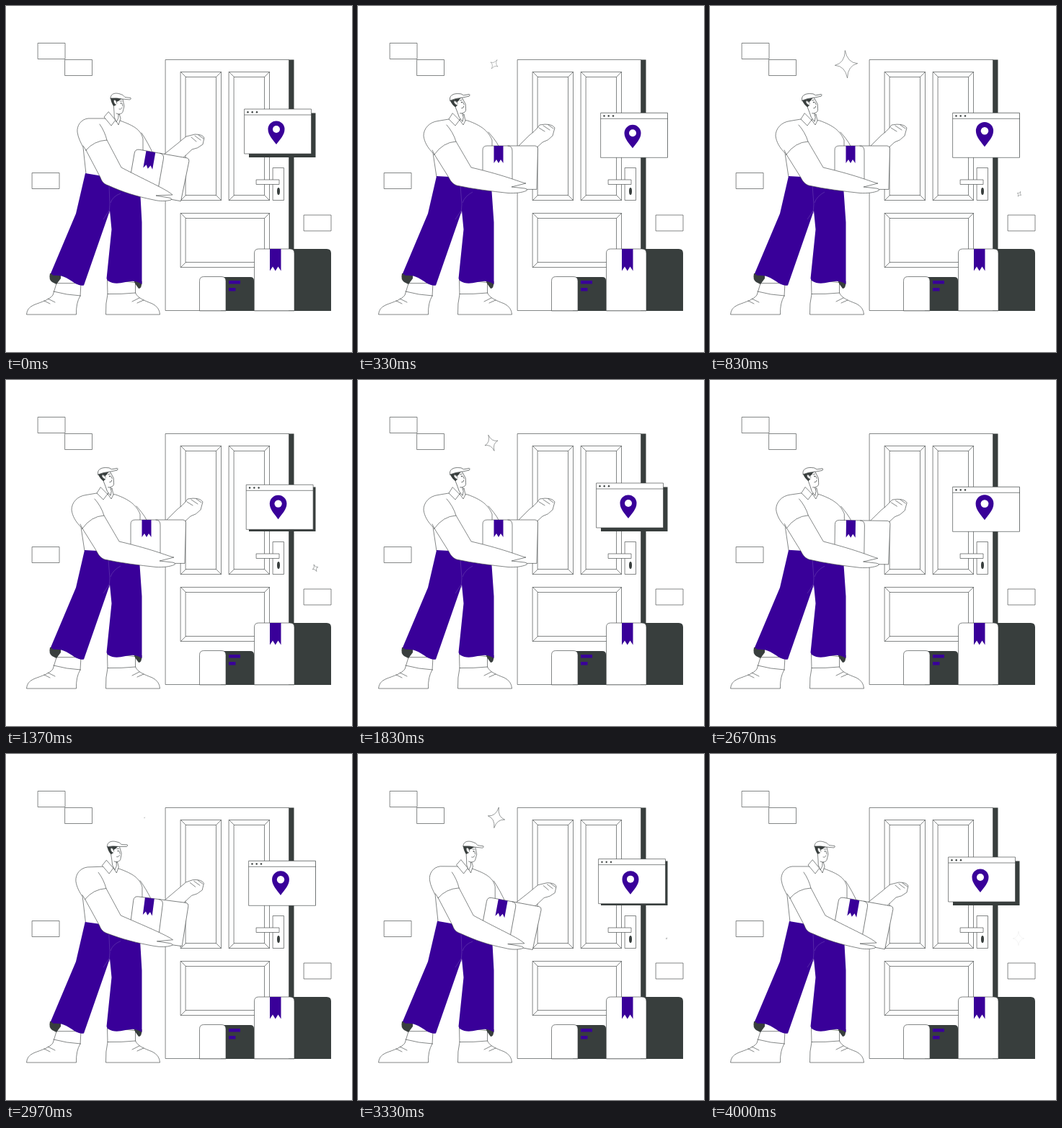
Recreate the animation shown at these times as an HTML page. Size 480 px wide and 480 px high, loop 4.03 s.

```html
<!DOCTYPE html>
<html lang="en">
<head>
<meta charset="utf-8">
<title>Delivery at the door</title>
<style>
html, body { margin: 0; width: 100%; height: 100%; overflow: hidden; background: #fff; }
svg { display: block; width: 100vw; height: 100vh; }
.l { fill: #fff; stroke: #414646; stroke-width: .65; stroke-linejoin: round; stroke-linecap: round; }
.n { fill: none; }
.d { fill: #383e3d; }
.p { fill: #390099; }
.c { fill: none; stroke: #6a42b2; stroke-width: .6; }
#stars path { stroke-width: .5; }
</style>
</head>
<body>
<svg viewBox="0 0 480 480">
  <g id="wall"></g>
  <g id="door">
    <path class="d" d="M392 74.500h7.500V340H392z"/>
    <path class="l" d="M221.500 74.500h171V422.500h-171z"/>
  </g>
  <path class="l" d="M370.500 224.500h15v45h-15z"/>
  <path class="l" d="M347.500 241h31.500v6.500h-31.500z"/>
  <ellipse class="d" cx="378" cy="257" rx="2" ry="5"/>

  <g id="boots">
    <path class="l" d="M70 385L65 401C60 408 50 410 38 415Q29 419 28.500 428H97.500Q97 412 103 402L104 385Z"/>
    <path class="l n" d="M66 396Q84 401 103.500 402M58 406l10 5M53 409l8 4"/>
    <path class="l" d="M140.500 380L141 400Q138 412 138.500 428H213.500Q213 418 203 413C190 408 183 405 179.500 398V384Z"/>
    <path class="l n" d="M141 399.500Q160 400 179.500 398M185 405l-10 5M191 408l-9 4"/>
    <path class="d" d="M61 371Q59 380 64 383L70 386L76 378V370ZM177 380L179 385L184 392Q188.500 392 188.500 382Z"/>
  </g>
  <g id="man"></g>
  <g id="parcel">
    <path class="l" d="M173 254V200Q173 194 179 194H246Q249.500 194.500 249.500 198L248 254Z"/>
    <path class="l n" d="M208 194Q214 194 214 201V250"/>
    <path class="p" d="M188.500 194h13v24l-3.500-5l-3 5l-3-5l-3.500 5z"/>
  </g>
  <g id="arm"></g>
  <g id="head">
    <path class="l" d="M149 134L150 147Q149 154 153 161Q157 156 156 150Q162 150 162.500 145L164 139L162 129H150Z"/>
    <path class="d" d="M145 128H161.500Q158 130 156 132Q153 132 153 137L149.500 139Q146 135 145 128Z"/>
    <path class="l" d="M152 137Q148 133 150 130Q153 130 154 135"/>
    <path class="l n" d="M157 143Q160 144 161 141M161 135l1 4M156 150l-3-1M158 132l3 0"/>
    <circle class="d" cx="159.500" cy="135" r=".8"/>
    <path class="l" d="M145 128C145 121 152 120 158 122Q163 123 165 126.500L173 127.500Q174 129 172 130L161 129Q153 127 145 128Z"/>
  </g>

  <g id="stack">
    <path class="d" d="M392 337h53q6 0 6 6V423H392z"/>
    <path class="d" d="M298 376h41q5 0 5 5V423H298z"/>
    <path class="l" d="M268.500 422.500V381.500q0-6 6-6H299q6 0 6 6V422.500z"/>
    <path class="p" d="M309 381h16v4.500h-16zM309 391h9.500v4.500H309z"/>
    <path class="l" d="M344.500 422.500V343q0-6 6-6H394q6 0 6 6V422.500z"/>
    <path class="p" d="M366 337h15.500V367.500l-4-6l-3.750 6l-3.750-6l-4 6z"/>
  </g>

  <path class="d" d="M337 148.500h92.500V210H337z"/>
  <g id="panel">
    <path class="l" d="M331 143h92.500v62H331zM331 151h92.500"/>
    <g class="d">
      <circle cx="335.500" cy="147.200" r="1.200"/>
      <circle cx="341.700" cy="147.200" r="1.200"/>
      <circle cx="348" cy="147.200" r="1.200"/>
    </g>
    <g id="pin">
      <path class="p" d="M375 192C370 185 363.500 179 363.500 171A11.500 11.500 0 0 1 386.500 171C386.500 179 380 185 375 192Z"/>
      <circle cx="375" cy="171" r="5" fill="#fff"/>
    </g>
  </g>
  <g id="stars"></g>
</svg>
<script>
const LOOP = 4030;
const $ = id => document.getElementById(id);

function add(parent, cls, d) {
  const el = document.createElementNS("http://www.w3.org/2000/svg", "path");
  el.setAttribute("class", cls);
  if (d) el.setAttribute("d", d);
  return $(parent).appendChild(el);
}

const rect = (x, y, w, h) => `M${x} ${y}h${w}v${h}h${-w}z`;
for (const [x, y] of [[44.5, 51.5], [82, 74.5], [36.5, 231.5], [413.5, 290]])
  add("wall", "l", rect(x, y, 37.5, 22));

// Door fields: outer frame, bevel inset, mitred corners.
function field(x, y, w, h, b) {
  add("door", "l", rect(x, y, w, h) + rect(x + b, y + b, w - 2 * b, h - 2 * b));
  for (const [cx, cy, sx, sy] of [[x, y, 1, 1], [x + w, y, -1, 1], [x, y + h, 1, -1], [x + w, y + h, -1, -1]])
    add("door", "l", `M${cx} ${cy}l${sx * b} ${sy * b}`);
}
field(242.5, 91.5, 56, 178, 7);
field(309.5, 91.5, 56, 178, 7);
field(242.5, 287.5, 123, 75, 7);

// Body parts: group, class, upright pose, leaning-back pose.
const parts = [
  ["man", "l",
    "M219 206L239 190Q246 184 250 181L262 178Q273 178 275 183L273 192Q266 198 258 199L242 214Z",
    "M221 196L237 180Q245 174 249 169L252 165Q268 162 273 169L270 180Q264 187 256 189L244 200Z"],
  ["man", "l n",
    "M257 182L264 188M262 180L270 186M267 179L274 184",
    "M251 169L259 174M257 166L266 172M264 165L271 170"],
  ["man", "l",
    "M136 156L114 156C104 157 98 166 99 175C100 183 104 190 107 196L111 233L150 245L190 240L190 184C187 172 178 166 158 159Z",
    "M126 157L111 159.500C99 161 91 170 91 180C92 189 97 197 104 204L109 237L148 245L186 245L186 186C181 174 172 166 152 159Z"],
  ["man", "l n",
    "M188 176C194 185 200 196 204 205",
    "M181 175C187 182 192 188 195 194"],
  ["man", "p",
    "M110 232L146 238L186 255L188.5 300L188.5 386C172 374 158 392 141 381L139.5 378L146.5 310L144 284L108 387.5C94 390 88 372 66 374L62 371L97 288Z",
    "M109 236L146 238L185 250L188.5 300L188.5 386C172 374 158 392 141 381L139.5 378L146.5 310L144 284L108 387.5C94 390 88 372 66 374L62 371L97 288Z"],
  ["man", "c",
    "M143 249L144 275L143 288M145 273Q148 264 159 260M135 296L143 284",
    "M142 249L144 275L143 288M145 273Q148 264 159 258M135 296L143 284"],
  ["arm", "l",
    "M111 200L131 238C133 244 136 247 142 249C162 258 180 264 205 269C213 271 222 271 229 269Q231 267 226 266L208 263L231 262C222 254 200 245 160 224L140 186Q122 187 111 200Z",
    "M106 206L126 238C129 244 132 247 137 249C160 254 185 257 208 259.500C218 260 228 259 234 256Q236 254 231 253L213 251L233 246C226 245 208 236 157 224L136 188Q118 189 106 206Z"],
  ["arm", "l n",
    "M107 194L111 200M140 186Q137 174 130 164",
    "M103 200L106 206M136 188Q132 175 123 165"],
  ["arm", "l",
    "M142 147L136 154L146 166L152 158L156 165L159 156L157 149L152 158Z",
    "M131 149L126 157L135 166L141 158L146 165L149 159L147 150L141 158Z"]
].map(([group, cls, a, b]) => ({ el: add(group, cls), a, b: b.match(/[\d.]+/g) }));

function morph({ el, a, b }, s) {
  let i = 0;
  el.setAttribute("d", a.replace(/[\d.]+/g, n => (+n + (b[i++] - n) * s).toFixed(2)));
}

// Eased value from a table of [time, value] steps.
function at(steps, t) {
  const i = steps.findIndex(k => k[0] > t);
  if (i < 0) return steps[steps.length - 1][1];
  if (i === 0) return steps[0][1];
  const [t0, v0] = steps[i - 1], [t1, v1] = steps[i];
  const u = (t - t0) / (t1 - t0);
  return v0 + (v1 - v0) * u * u * (3 - 2 * u);
}

const lean = [[0, 0], [320, 1], [540, 1.18], [800, 1], [2560, 1], [3180, 0], [3330, -.05], [3600, 0]];
const slide = [[0, 0], [320, 1], [1100, 1], [1600, 0], [1850, 0], [2350, 1], [3050, 1], [3610, 0]];
const hop = [[430, 0], [1080, 1], [1580, 0], [2150, 0], [2670, 1], [3230, 0]];

// x, y, radius, start, peak, end, initial turn
const stars = [
  [189, 81, 21, 130, 800, 1090, 45],
  [185, 87.5, 20, 1450, 2150, 2650, -45],
  [192, 88.5, 19.5, 2960, 3480, 3760, 45],
  [429, 261, 9, 650, 1150, 1600, 45],
  [426.5, 262, 9, 2030, 2350, 2650, -45],
  [428, 256, 9.5, 3290, 3720, 4100, 45]
].map(s => ({ s, el: add("stars", "l n") }));

function twinkle({ s, el }, t) {
  const [x, y, r, t0, tp, t1, turn] = s;
  const on = t > t0 && t < t1;
  el.style.display = on ? "" : "none";
  if (!on) return;
  const fades = t1 > LOOP && t > tp;
  const u = fades ? 1 : t < tp ? (t - t0) / (tp - t0) : (t1 - t) / (t1 - tp);
  const size = r * u ** .9, q = size * .1, w = size * .83;
  const angle = turn * (1 - u) * (t < tp ? 1 : -1);
  el.setAttribute("d", `M0 ${-size}Q${q} ${-q} ${w} 0Q${q} ${q} 0 ${size}Q${-q} ${q} ${-w} 0Q${-q} ${-q} 0 ${-size}Z`);
  el.setAttribute("transform", `translate(${x} ${y}) rotate(${angle})`);
  el.style.opacity = fades ? at([[3720, 1], [4000, .1]], t) : Math.min(1, .35 + u);
}

function draw(t) {
  const s = at(lean, t), k = 1 - s, p = at(slide, t), h = at(hop, t);
  parts.forEach(part => morph(part, s));
  $("parcel").setAttribute("transform", `translate(${6 * k} ${7 * k}) rotate(${10 * k} 189 194)`);
  $("head").setAttribute("transform", `translate(${-11 * s} ${.7 * s}) rotate(${-17 * s} 150 150)`);
  $("panel").setAttribute("transform", `translate(${6 * p} ${5.3 * p})`);
  $("pin").setAttribute("transform", `translate(375 ${192 - 3 * h}) scale(${1 + .08 * h}) translate(-375 -192)`);
  stars.forEach(star => twinkle(star, t));
}

const start = performance.now();
function tick() {
  draw((performance.now() - start) % LOOP);
  requestAnimationFrame(tick);
}
tick();
</script>
</body>
</html>
```
